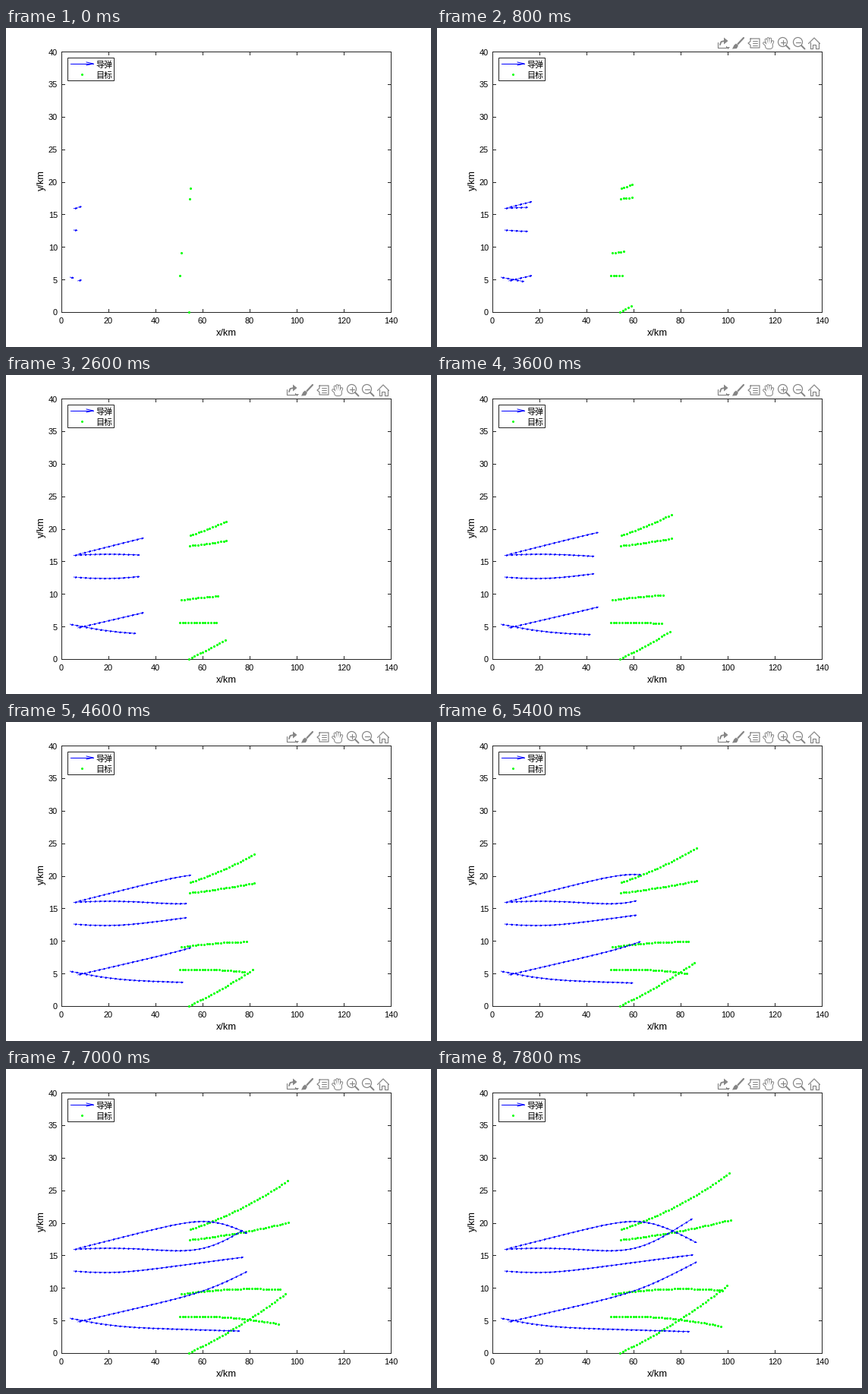
Write a matplotlib script that moves like this. It is 560 by 420 pixels and loops after 8000 ms.

```python
import numpy as np
import matplotlib.pyplot as plt
from matplotlib.animation import FuncAnimation
from matplotlib.collections import LineCollection
from matplotlib.patches import Circle, Polygon, Rectangle

W, H, DPI = 560, 420, 100
FRAMES, INTERVAL = 40, 200
PX = 72 / DPI
INK, GREY, BLUE, GREEN = "#262626", "#858585", "#0000ff", "#00ff00"
LEFT, RIGHT, TOP, BOTTOM = 73, 507, 31, 374
KM_X, KM_Y = (RIGHT - LEFT) / 140, (BOTTOM - TOP) / 40
STEP = np.arange(FRAMES)

plt.rcParams["font.family"] = "Liberation Sans"
fig = plt.figure(figsize=(W / DPI, H / DPI), dpi=DPI, facecolor="white")
ax = fig.add_axes([0, 0, 1, 1])
ax.set_xlim(0, W)
ax.set_ylim(H, 0)
ax.axis("off")


def line(points, color=INK, width=1.0, **kw):
    x, y = zip(*points)
    return ax.plot(x, y, color=color, lw=width * PX, **kw)[0]


def label(x, y, text, size, **kw):
    kw = {"ha": "center", "va": "center_baseline", "color": "black", **kw}
    ax.text(x, y, text, fontsize=size * PX, **kw)


def box(x0, y0, x1, y1, **kw):
    ax.add_patch(Rectangle((x0, y0), x1 - x0, y1 - y0, ec=INK, lw=PX, **kw))


# Axes
box(LEFT, TOP, RIGHT, BOTTOM, fc="none", zorder=1)
for km in range(0, 141, 20):
    x = LEFT + KM_X * km
    for y, end in ((BOTTOM, BOTTOM - 4), (TOP, TOP + 4)):
        line([(x, y), (x, end)], zorder=1)
    label(x, 385, str(km), 11)
for km in range(0, 41, 5):
    y = BOTTOM - KM_Y * km
    for x, end in ((LEFT, LEFT + 4), (RIGHT, RIGHT - 4)):
        line([(x, y), (end, y)], zorder=1)
    label(68, y + 0.5, str(km), 11, ha="right")
label(290.5, 402.3, "x/km", 12.8, va="center")
label(47, 200.5, "y/km", 12.8, va="center", rotation=90)

# Legend
box(81, 39, 142, 69, fc="white", zorder=5)
line([(85, 47), (115, 47)], BLUE, zorder=6)
line([(106, 45), (115, 47), (106, 49)], BLUE, zorder=6)
ax.plot([100], [61], "o", ms=3 * PX, mew=0, color=GREEN, zorder=6)
for y, text in ((48, "导弹"), (62, "目标")):
    label(118.5, y, text, 11, ha="left", family="Noto Sans CJK JP", zorder=6)

# Toolbar
tools = []


def stroke(points, width=1.2, color=GREY):
    tools.append(line(points, color, width, solid_joinstyle="round",
                      solid_capstyle="round"))


def fill(*points):
    tools.append(ax.add_patch(Polygon(points, fc=GREY, lw=0)))


def share_icon():
    stroke([(370, 19), (370, 26), (381, 26), (381, 24)])
    stroke([(373, 22), (374.5, 18), (379, 17)], 1.8)
    fill((378, 12.5), (383.5, 17), (378, 21.5))
    fill((381, 25), (386, 25), (383.5, 28))


def brush_icon():
    stroke([(404, 13), (396.5, 21)], 2.2)
    fill((389, 27.5), (391.5, 22.5), (394, 20.5), (397, 23), (395, 27))


def note_icon():
    stroke([(413, 14), (425, 14), (425, 26), (413, 26), (413, 22.5),
            (410, 20), (413, 17.5), (413, 14)])
    for y in (17, 20, 23):
        stroke([(416, y), (422, y)], 1)


def hand_icon():
    tips = [(431, 20), (433.5, 15.5), (436.3, 14), (439.3, 14.5), (442.3, 18)]
    for color, trim in ((GREY, 0), ("white", 2)):
        for i, tip in enumerate(tips):
            stroke([tip, (434.5 + 1.4 * i, 23)], 3.8 - trim, color)
        stroke([(435.5, 23.5), (438.8, 23.5)], 8 - trim, color)


def zoom_icon(cx, plus):
    cy = 18.5
    tools.append(ax.add_patch(
        Circle((cx, cy), 6, fc="none", ec=GREY, lw=1.2 * PX)))
    stroke([(cx + 4.5, cy + 4.5), (cx + 9, cy + 9)], 2)
    stroke([(cx - 3, cy), (cx + 3, cy)])
    if plus:
        stroke([(cx, cy - 3), (cx, cy + 3)])


def home_icon(cx):
    stroke([(cx - 7.5, 20.5), (cx, 13), (cx + 7.5, 20.5)])
    for s in (-1, 1):
        stroke([(cx + 5.5 * s, 19), (cx + 5.5 * s, 27), (cx + 2 * s, 27),
                (cx + 2 * s, 22), (cx, 22)])


share_icon()
brush_icon()
note_icon()
hand_icon()
zoom_icon(455.5, True)
zoom_icon(475.5, False)
home_icon(497)

# Missiles (pixels): start x, y, slope, bend, slope change, turn x, turn width
MISSILES = [
    (94.3, 236.3, -0.252, 0, 0.81, 275, 20),
    (88.8, 237.5, -0.067, 0.00075, -0.98, 266, 22),
    (88.8, 266, 0.1, 0.00005, -0.25, 138, 22),
    (94.3, 333, -0.231, 0, -0.3, 270, 20),
    (84, 328, 0.21, 0, -0.18, 140, 20),
]

# Targets (km, radians): start x, y, heading, turn per step
TARGETS = [
    (54.7, 19.0, 0.115, 0.0036),
    (54.5, 17.4, 0.04, 0.0013),
    (51.0, 9.05, 0.055, -0.0022),
    (50.3, 5.6, 0.013, -0.0023),
    (54.2, 0.05, 0.17, 0.0027),
]


def missile_arrows(x0, y0, slope, bend, change, turn, width):
    """A gentle parabola that turns smoothly; one arrow for each step."""
    def height(x):
        s = x - x0
        soft = np.logaddexp(0, (x - turn) / width)
        soft -= np.logaddexp(0, (x0 - turn) / width)
        return y0 + slope * s + bend * s**2 + change * width * soft

    x = x0 + 2 * KM_X * STEP
    tail = np.column_stack([x, height(x)])
    way = np.column_stack([np.ones(FRAMES), height(x + 0.5) - height(x - 0.5)])
    way /= np.hypot(*way.T)[:, None]
    side = way[:, ::-1] * [-0.9, 0.9]
    tip = tail + way * (6.6 - 1.6 * np.exp(-STEP / 8))[:, None]
    back = tip - 2.2 * way
    return np.stack([tail, tip, back + side, tip, back - side], axis=1)


def target_dots(x0, y0, heading, turn):
    """Constant speed of 1.2 km per step with a steady turn."""
    angle = heading + turn * (STEP - 0.5)
    move = 1.2 * np.column_stack([np.cos(angle), np.sin(angle)])
    move[0] = x0, y0
    return [LEFT, BOTTOM] + np.cumsum(move, axis=0) * [KM_X, -KM_Y]


arrows = np.array([missile_arrows(*m) for m in MISSILES])
dots = np.array([target_dots(*t) for t in TARGETS])

shots = LineCollection([], colors=BLUE, linewidths=0.8 * PX, zorder=3)
ax.add_collection(shots, autolim=False)
marks, = ax.plot([], [], "o", ms=3.1 * PX, mew=0, color=GREEN, zorder=2,
                 snap=False)


def draw(n):
    shots.set_segments(arrows[:, :n + 1].reshape(-1, 5, 2))
    marks.set_data(*dots[:, :n + 1].reshape(-1, 2).T)
    for part in tools:
        part.set_visible(n > 0)
    return [shots, marks, *tools]


anim = FuncAnimation(fig, draw, frames=FRAMES, init_func=lambda: draw(0),
                     interval=INTERVAL, repeat=True, repeat_delay=0)
plt.show()
```
